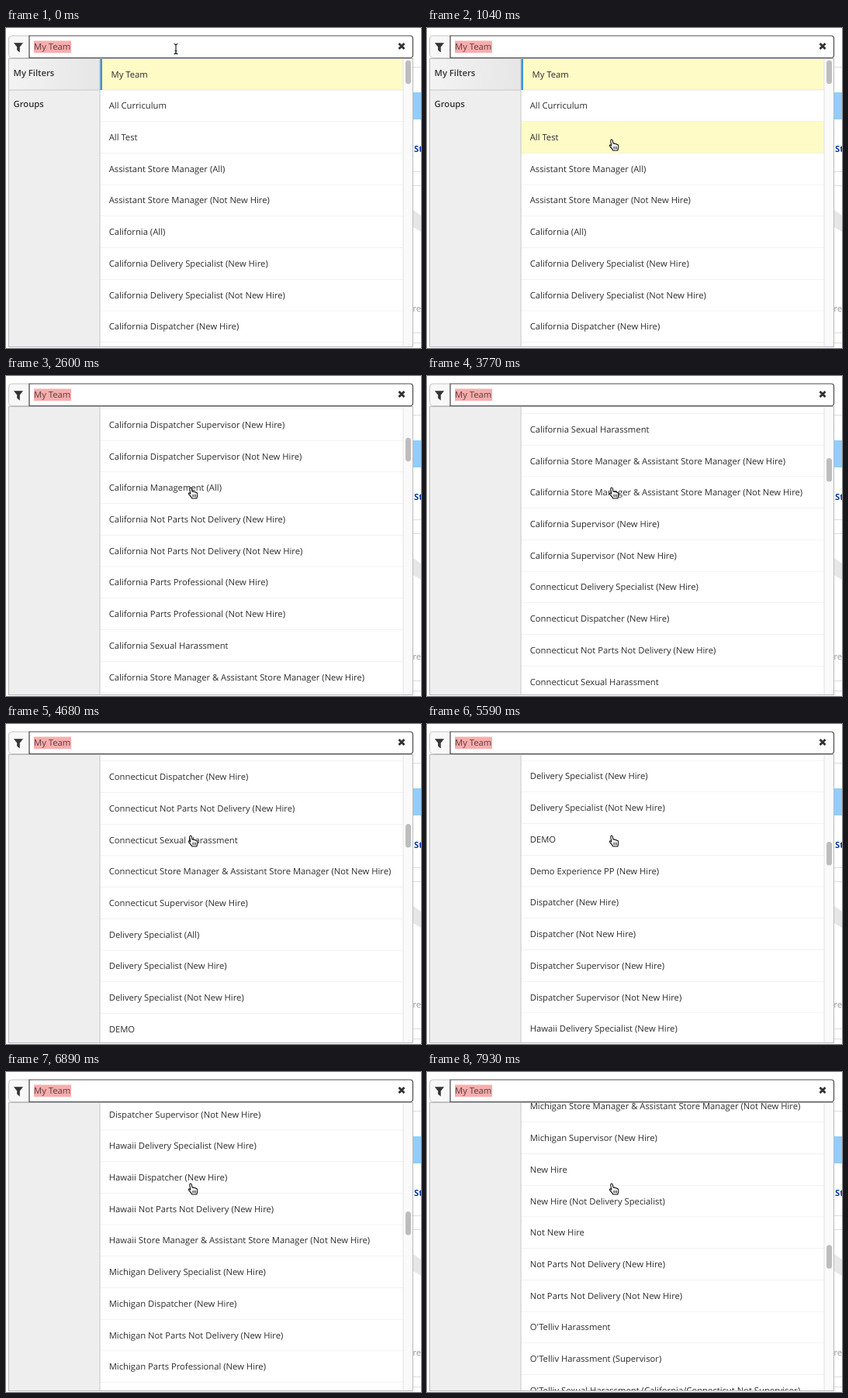
An HTML page that plays this animation: 535 by 413 pixels, repeating every 8 s.

```html
<!DOCTYPE html>
<html lang="en">
<head>
<meta charset="utf-8">
<title>Filter list</title>
<style>
  html, body { margin: 0; width: 100%; height: 100%; overflow: hidden; background: #fff; }
  svg { display: block; }
  text {
    font: 11.25px "Open Sans", "Noto Sans", sans-serif;
    fill: #2c2c2c;
    white-space: pre;
    text-rendering: geometricPrecision;
  }
  .head { font-weight: 600; fill: #333; }
  .link { font-weight: 700; fill: #0b3ca6; }
  .faint { fill: #999; }
  .picked { fill: #5a3c3c; }
</style>
</head>
<body>
<svg width="535" height="413" viewBox="0 0 535 413">
  <defs>
    <clipPath id="view"><rect x="4" y="39" width="521" height="372"/></clipPath>
    <linearGradient id="shade">
      <stop offset="0" stop-color="#f3f3f3"/><stop offset="1" stop-color="#e6e6e6"/>
    </linearGradient>
  </defs>

  <!-- page behind the panel -->
  <g>
    <path d="M525 50.5H535M525 185.5H535M525 203.5H535M525 393.5H535M525 406.5H535" stroke="#ddd"/>
    <rect x="525" y="83" width="10" height="35" fill="#92cdfb"/>
    <text class="link" x="526" y="160">St</text>
    <path d="M525 235L535 242V263L525 257Z" fill="#e6e6e6"/>
    <text class="faint" x="524.5" y="366">re</text>
  </g>

  <!-- dropdown -->
  <rect x="4" y="39" width="521" height="372" fill="#fff"/>
  <rect x="4" y="39" width="117" height="372" fill="#eee"/>
  <g clip-path="url(#view)">
    <g id="content">
      <rect x="4" y="39" width="117" height="41" fill="url(#shade)"/>
      <rect x="4" y="79.5" width="117" height="1" fill="#c8c8c8"/>
      <text class="head" x="9.5" y="61.5">My Filters</text>
      <text class="head" x="9.5" y="102">Groups</text>
      <g id="rows"></g>
    </g>
  </g>
  <path d="M121 40V411" stroke="#c6c6c6"/>
  <rect x="512" y="39" width="13" height="372" fill="#fafafa"/>
  <path d="M512 40V411" stroke="#e2e2e2"/>
  <rect id="thumb" x="515" width="7" height="30.5" rx="3.5" fill="#bdbdbd"/>
  <rect x="3.5" y="39.5" width="521" height="372" fill="none" stroke="#b9b9b9"/>

  <!-- search bar -->
  <path d="M30 10H7.5Q3.5 10 3.5 14V34.5Q3.5 38.5 7.5 38.5H30Z" fill="#f8f8f8" stroke="#c4c4c4"/>
  <path d="M30 10H521Q524.5 10 524.5 13.5V35Q524.5 38.5 521 38.5H30Z" fill="#fff" stroke="#4a4a4a" stroke-width="1.2"/>
  <path d="M10.5 19.5H21.5L17.5 24.5V31L14.5 28.5V24.5Z" fill="#333" stroke="#333" stroke-width=".6" stroke-linejoin="round"/>
  <rect x="36" y="16.5" width="48" height="15.5" fill="#f8adad"/>
  <text class="picked" x="36" y="28">My Team</text>
  <path d="M506.5 20L513.5 27M513.5 20L506.5 27" stroke="#333" stroke-width="2.9"/>

  <!-- pointers -->
  <path id="beam" d="M-2.5 -6.5Q0 -6.5 0 -4.5V4.5Q0 6.5 -2.5 6.5M2.5 -6.5Q0 -6.5 0 -4.5M0 4.5Q0 6.5 2.5 6.5M-1.5 2.5H1.5" fill="none" stroke="#111" stroke-width="1.1"/>
  <g id="hand" stroke="#111" stroke-linejoin="round" stroke-linecap="round">
    <path d="M-3.2 1.2L-4.2 -5.2Q-4.3 -7 -3 -7Q-1.9 -7 -1.6 -5.4L-1 -1.8Q.6 -2.6 1.5 -1.3Q3 -1.9 3.8 -.6Q5.6 -.7 5.8 1.2Q6 3.6 4.8 7H-1.2Q-2.2 4.8 -5 2Q-6.2 .6 -5.2 0Q-4.3 -.4 -3.2 1.2Z" fill="#fff" stroke-width="1.1"/>
    <path d="M-.2 2.2V5M1.7 2.2V5M3.5 2.2V5" fill="none" stroke-width=".8"/>
  </g>
</svg>
<script>
const LOOP = 8000, TICK = 130, TOP = 39.5, PITCH = 40.72;
const NEW = "(New Hire)", NOT = "(Not New Hire)";
const both = name => [`${name} ${NEW}`, `${name} ${NOT}`];
const managers = "Store Manager & Assistant Store Manager";
const fresh = (place, ...jobs) => jobs.map(job => `${place} ${job} ${NEW}`);

const names = [
  "My Team", "All Curriculum", "All Test",
  "Assistant Store Manager (All)", `Assistant Store Manager ${NOT}`,
  "California (All)",
  ...both("California Delivery Specialist"),
  ...both("California Dispatcher"),
  ...both("California Dispatcher Supervisor"),
  "California Management (All)",
  ...both("California Not Parts Not Delivery"),
  ...both("California Parts Professional"),
  "California Sexual Harassment",
  ...both(`California ${managers}`),
  ...both("California Supervisor"),
  ...fresh("Connecticut", "Delivery Specialist", "Dispatcher", "Not Parts Not Delivery"),
  "Connecticut Sexual Harassment",
  `Connecticut ${managers} ${NOT}`,
  `Connecticut Supervisor ${NEW}`,
  "Delivery Specialist (All)",
  ...both("Delivery Specialist"),
  "DEMO", `Demo Experience PP ${NEW}`,
  ...both("Dispatcher"),
  ...both("Dispatcher Supervisor"),
  ...fresh("Hawaii", "Delivery Specialist", "Dispatcher", "Not Parts Not Delivery"),
  `Hawaii ${managers} ${NOT}`,
  ...fresh("Michigan", "Delivery Specialist", "Dispatcher", "Not Parts Not Delivery"),
  ...both("Michigan Parts Professional"),
  ...both(`Michigan ${managers}`),
  `Michigan Supervisor ${NEW}`,
  "New Hire", "New Hire (Not Delivery Specialist)", "Not New Hire",
  ...both("Not Parts Not Delivery"),
  "O'Telliv Harassment", "O'Telliv Harassment (Supervisor)",
  "O'Telliv Sexual Harassment (California/Connecticut Not Supervisor)"
];

// [time, value...] steps
const scrollSteps = [[0, 0], [1170, 0], [1430, 55], [2600, 404], [3770, 683], [5590, 1173], [6890, 1471], [7930, 1929]];
const pointerSteps = [[0, 219, 27], [260, 219, 27], [520, 224, 52], [780, 237, 128], [910, 241, 151]];

const $ = id => document.getElementById(id);
const NS = "http://www.w3.org/2000/svg";
function add(tag, attrs, text) {
  const el = document.createElementNS(NS, tag);
  for (const key in attrs) el.setAttribute(key, attrs[key]);
  if (text) el.textContent = text;
  return $("rows").appendChild(el);
}

const fills = names.map((name, i) => {
  const y = TOP + i * PITCH;
  const fill = add("rect", { x: 121, y, width: 391, height: PITCH, fill: i ? "#fff" : "#fefbc6" });
  add("rect", { x: 121, y: y + PITCH - .5, width: 391, height: 1, fill: i ? "#e6e6e6" : "#d2d2c6" });
  if (!i) add("rect", { x: 121, y, width: 3, height: PITCH, fill: "#3d93dc" });
  add("text", { x: i ? 132.7 : 135.5, y: y + 24.1 }, name);
  return fill;
});

function sample(steps, t) {
  const n = steps.findIndex(s => s[0] > t);
  if (n < 0) return steps[steps.length - 1].slice(1);
  const a = steps[n - 1], b = steps[n], k = (t - a[0]) / (b[0] - a[0]);
  return a.slice(1).map((v, i) => v + (b[i + 1] - v) * k);
}

function draw(now) {
  const t = Math.floor(now % LOOP / TICK) * TICK;
  const [scroll] = sample(scrollSteps, t);
  const [x, y] = sample(pointerSteps, t);
  const overList = y > TOP;
  // The hovered row keeps its colour while the list scrolls away.
  const hover = overList ? Math.floor((y - TOP) / PITCH) : -1;

  $("content").setAttribute("transform", `translate(0 ${-scroll})`);
  $("thumb").setAttribute("y", 41.7 + scroll * .0941);
  fills.forEach((el, i) => el.setAttribute("fill", !i || i === hover ? "#fefbc6" : "#fff"));
  for (const id of ["beam", "hand"]) {
    $(id).setAttribute("transform", `translate(${x} ${y})`);
    $(id).setAttribute("visibility", (id === "hand") === overList ? "visible" : "hidden");
  }
}

const start = performance.now();
function frame() {
  draw(performance.now() - start);
  requestAnimationFrame(frame);
}
frame();
</script>
</body>
</html>
```
